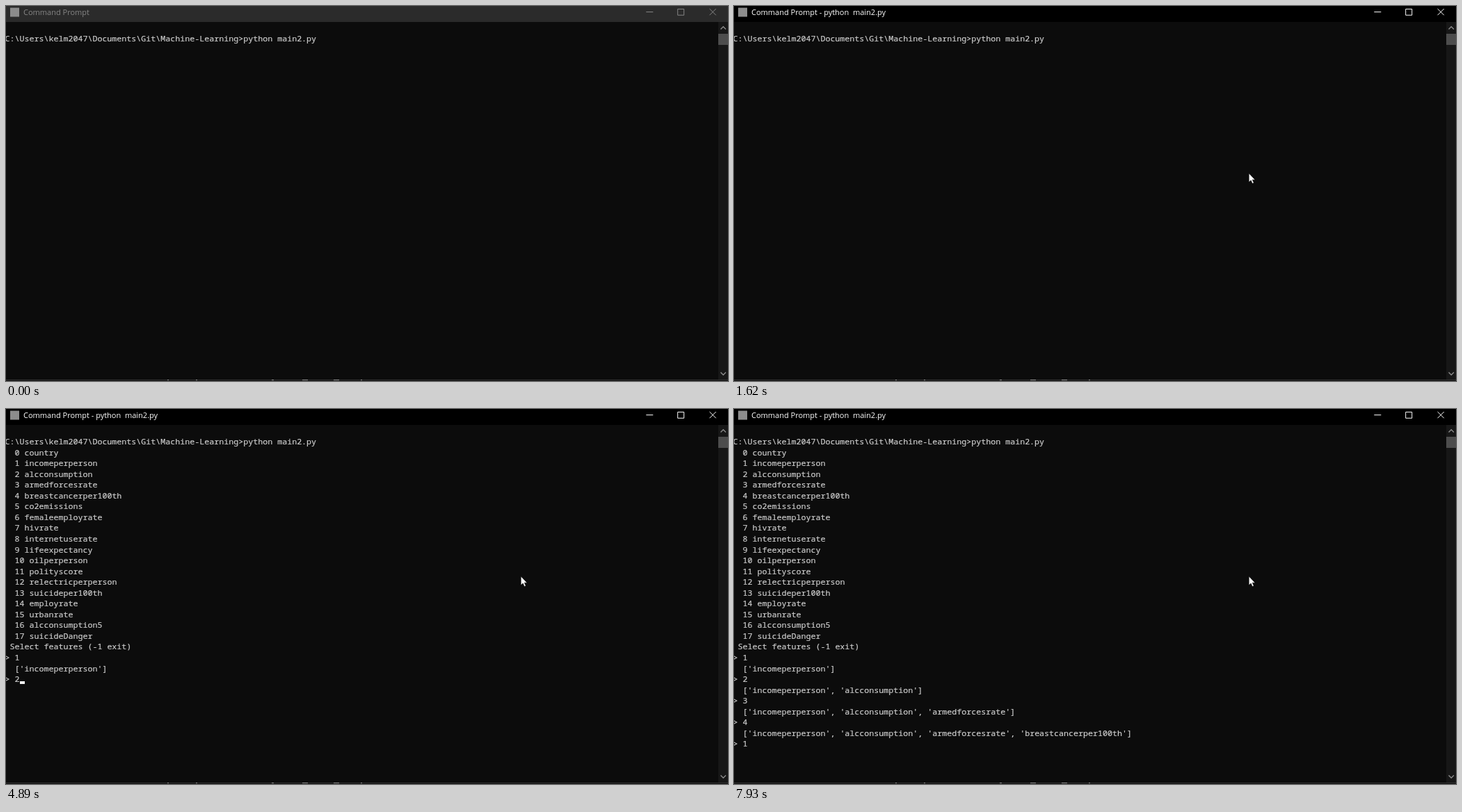
Animation, 1038 px wide and 540 px high, one loop 8000 ms. Source, as an HTML page:

```html
<!DOCTYPE html>
<html lang="en">
<head>
<meta charset="utf-8">
<title>Command Prompt</title>
<style>
  html, body { margin: 0; width: 100%; height: 100%; overflow: hidden; background: #0c0c0c; }
  svg { display: block; width: 1038px; height: 540px; }
  text { white-space: pre; }
  #term text {
    font: 11.667px "Noto Sans Mono", "DejaVu Sans Mono", monospace;
    fill: #ccc; stroke: #ccc; stroke-width: .2;
  }
  #bar { fill: #2b2b2b; color: #868686; }
  #bar.active { fill: #000; color: #fff; }
  #bar text { font: 11px "Open Sans", "Noto Sans", sans-serif; fill: currentColor; }
  #buttons { fill: none; stroke: currentColor; }
  .chevron { fill: none; stroke: #8a8a8a; stroke-width: 1.4; }
  .crisp { shape-rendering: crispEdges; }
</style>
</head>
<body>
<svg viewBox="0 0 1038 540">
  <rect width="1038" height="540" fill="#0c0c0c"/>
  <g id="bar">
    <rect width="1038" height="23"/>
    <rect x="6" y="2.5" width="13" height="13" fill="#8c8c8c"/>
    <text id="title" x="25" y="13"></text>
    <path id="buttons" d="M920.3 8.6h10M965.7 4.4h9v8.8h-9zM1011.5 4l9.2 9.2M1020.7 4l-9.2 9.2"/>
  </g>

  <rect x="1024" y="23" width="14" height="515" fill="#171717"/>
  <rect x="1024" y="40" width="14" height="16" fill="#4d4d4d"/>
  <path class="chevron" d="M1027.5 33.5l3.7-3.7 3.7 3.7M1027.5 527.5l3.7 3.7 3.7-3.7"/>

  <g class="crisp">
    <rect y="538" width="1038" height="1" fill="#333"/>
    <path d="M232 538.5h2M273 538.5h2M382 538.5h3M426 538.5h8M471 538.5h8M510 538.5h2" stroke="#999"/>
  </g>

  <g id="term"></g>
  <rect id="caret" class="crisp" width="7" height="4" fill="#f2f2f2"/>
  <path id="pointer" d="M0 0v12.6l2.9-2.7 2 4.7 2.1-.9-2-4.5h3.8z" fill="#fff" stroke="#000" stroke-width=".5"/>
  <circle id="click" cx="739.5" cy="240" r="11.8" fill="#ff0" fill-opacity=".5"/>
</svg>
<script>
const LOOP = 8000, LEFT = -1.5, CELL = 7, LINE = 15.55, BLINK = 528;
const FOCUS = 530, RUN = 1620, LISTED = 2930;
const $ = id => document.getElementById(id);
const colX = col => LEFT + col * CELL;
const show = (el, on) => el.setAttribute("visibility", on ? "visible" : "hidden");
const lines = [], steps = [];

function print(at, row, col, str) {
  const el = document.createElementNS("http://www.w3.org/2000/svg", "text");
  el.setAttribute("x", colX(col));
  el.setAttribute("y", 51 + row * LINE);
  el.textContent = str;
  $("term").append(el);
  lines.push({ el, at });
}

// Moves the caret; lit turns it on, hold makes it ignore the next blink
const caretTo = (at, row, col, change) => steps.push({ at, row, col, ...change });

const command = "C:\\Users\\kelm2047\\Documents\\Git\\Machine-Learning>python main2.py";
const features = ("country incomeperperson alcconsumption armedforcesrate breastcancerper100th " +
  "co2emissions femaleemployrate hivrate internetuserate lifeexpectancy oilperperson polityscore " +
  "relectricperperson suicideper100th employrate urbanrate alcconsumption5 suicideDanger").split(" ");

print(0, 0, 0, command);
caretTo(0, 0, command.length, { hold: true });
caretTo(RUN, 1, 0);
features.forEach((name, i) => print(LISTED, i + 1, 2, i + " " + name));
print(LISTED, 19, 1, "Select features (-1 exit)");
print(LISTED, 20, 0, ">");
caretTo(LISTED, 20, 2, { hold: true });

// Key presses: a digit, Enter, a digit, Enter ...
const digits = "12341";
[3790, 4480, 4890, 5110, 5960, 6220, 6680, 6910, 7840].forEach((at, i) => {
  const n = i >> 1, row = 20 + 2 * n;
  if (i % 2 === 0) {
    print(at, row, 2, digits[n]);
    caretTo(at, row, 3, { lit: true });
  } else {
    const chosen = features.slice(1, n + 2).map(s => `'${s}'`);
    print(at, row + 1, 2, `[${chosen.join(", ")}]`);
    print(at, row + 2, 0, ">");
    caretTo(at, row + 2, 2, { lit: true, hold: true });
  }
});

for (let at = BLINK; at < LOOP; at += BLINK) steps.push({ at, blink: true });
steps.sort((a, b) => a.at - b.at);

// Carry the caret's state from step to step
let last = { lit: false };
const carets = steps.map(step => last = step.blink
  ? { ...last, at: step.at, lit: last.hold ? last.lit : !last.lit, hold: false }
  : { ...last, ...step });

function drawCaret(t) {
  const { row, col, lit } = carets.findLast(c => c.at <= t);
  show($("caret"), lit);
  $("caret").setAttribute("x", Math.round(colX(col)));
  $("caret").setAttribute("y", Math.round(50 + row * LINE));
}

// The pointer slows down as it arrives, in three hops
function drawPointer(t) {
  const hop = Math.min(3, Math.floor((t - 70) / 73));
  const left = 1 - Math.sin(hop / 3 * Math.PI / 2);
  show($("pointer"), hop >= 0);
  $("pointer").setAttribute("transform", `translate(${740.3 + 172 * left} ${241 + 223 * left})`);
}

function draw(t) {
  lines.forEach(({ el, at }) => show(el, t >= at));
  $("bar").classList.toggle("active", t >= FOCUS);
  $("title").textContent = "Command Prompt" + (t >= RUN ? " - python  main2.py" : "");
  drawCaret(t);
  drawPointer(t);
  show($("click"), t >= FOCUS && t < FOCUS + 160);
}

const start = performance.now();
function tick() {
  draw((performance.now() - start) % LOOP);
  requestAnimationFrame(tick);
}
tick();
</script>
</body>
</html>
```
